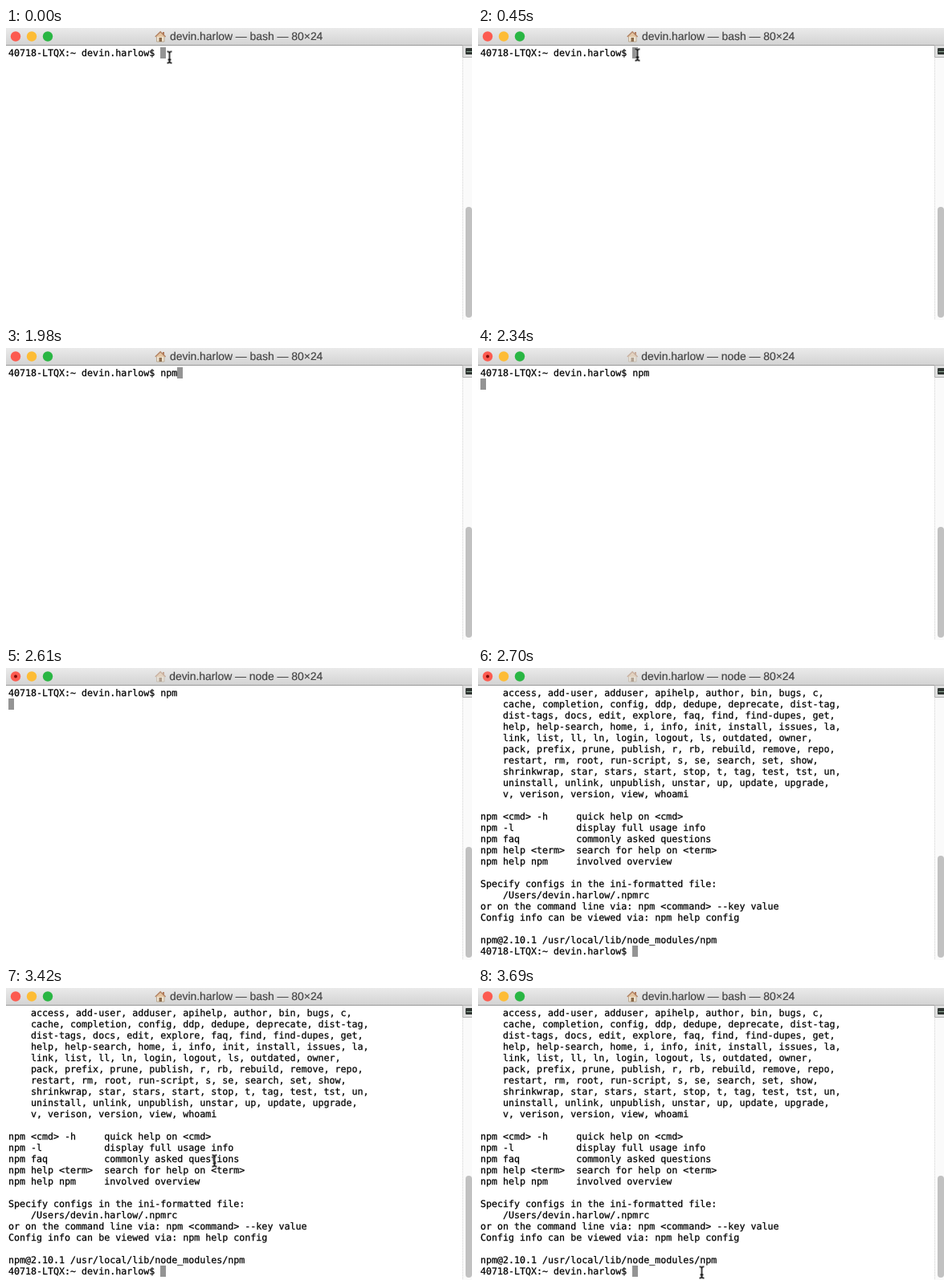
Write an HTML page that moves like this. It is 580 px wide and 364 px high and loops after 3780 ms.

```html
<!DOCTYPE html>
<html lang="en">
<head>
<meta charset="utf-8">
<title>Terminal</title>
<style>
  html, body { margin: 0; width: 100%; height: 100%; overflow: hidden; background: #fff; }
  #stage { position: relative; width: 580px; height: 364px; overflow: hidden; background: #fff; }
  svg, pre, #cursor { position: absolute; left: 0; top: 0; margin: 0; }
  pre {
    left: 3px; top: 24px; color: #000;
    font: 11.65px/14px "DejaVu Sans Mono", monospace;
    text-rendering: geometricPrecision;
    -webkit-text-stroke: .25px #000;
  }
  #cursor { width: 7px; height: 14px; background: #949494; }
  .title {
    font: 13.9px "Liberation Sans", Arial, sans-serif; fill: #404040;
    stroke: #404040; stroke-width: .15px; text-rendering: geometricPrecision;
  }

  /* One loop is 42 ticks of 90 ms; every change is a hard step. */
  .anim { animation: 3780ms step-end infinite; }
  #cursor { animation-name: caret; }
  #pointer { animation-name: pointer; }
  #thumb { animation-name: thumb; }
  .idle { animation-name: idle; }
  .busy { animation-name: busy; }
  .house { animation-name: fade; }
  .before { animation-name: before; }
  .after { animation-name: after; }
  .key1 { animation-name: key1; }
  .key2 { animation-name: key2; }

  @keyframes caret {
    0% { transform: translate(192px, 24px); }
    42.856% { transform: translate(199px, 24px); }
    52.38% { transform: translate(213px, 24px); }
    59.523% { transform: translate(3px, 38px); }
    71.428%, 100% { transform: translate(192px, 346px); }
  }
  @keyframes pointer {
    0% { transform: translate(203.5px, 36.5px); opacity: 1; }
    2.38% { transform: translate(202.5px, 36px); opacity: 1; }
    4.761% { transform: translate(201.5px, 35px); opacity: 1; }
    7.142% { transform: translate(200.5px, 34.5px); opacity: 1; }
    9.523% { transform: translate(199.5px, 34px); opacity: 1; }
    11.904% { transform: translate(198.5px, 33.5px); opacity: 1; }
    42.856% { transform: translate(198.5px, 33.5px); opacity: 0; }
    85.714% { transform: translate(215.5px, 58.5px); opacity: 1; }
    88.095% { transform: translate(240.5px, 130.5px); opacity: 1; }
    90.476% { transform: translate(259.5px, 215.5px); opacity: 1; }
    92.857% { transform: translate(269.5px, 280.5px); opacity: 1; }
    95.238% { transform: translate(274.5px, 319.5px); opacity: 1; }
    97.619%, 100% { transform: translate(278.5px, 354.5px); opacity: 1; }
  }
  @keyframes thumb {
    0% { y: 223px; height: 138px; }
    71.428%, 100% { y: 234px; height: 127px; }
  }
  @keyframes idle {
    0% { visibility: visible; }
    61.904% { visibility: hidden; }
    83.333%, 100% { visibility: visible; }
  }
  @keyframes busy {
    0% { visibility: hidden; }
    61.904% { visibility: visible; }
    83.333%, 100% { visibility: hidden; }
  }
  @keyframes fade {
    0% { opacity: 1; }
    61.904% { opacity: .5; }
    83.333%, 100% { opacity: 1; }
  }
  @keyframes before {
    0% { visibility: visible; }
    71.428%, 100% { visibility: hidden; }
  }
  @keyframes after {
    0% { visibility: hidden; }
    71.428%, 100% { visibility: visible; }
  }
  @keyframes key1 {
    0% { opacity: 0; }
    42.856%, 100% { opacity: 1; }
  }
  @keyframes key2 {
    0% { opacity: 0; }
    52.38%, 100% { opacity: 1; }
  }
</style>
</head>
<body>
<div id="stage">
  <div id="cursor" class="anim"></div>

  <pre class="anim before">40718-LTQX:~ devin.harlow$ <span class="anim key1">n</span><span class="anim key2">pm</span></pre>

  <pre class="anim after">    access, add-user, adduser, apihelp, author, bin, bugs, c,
    cache, completion, config, ddp, dedupe, deprecate, dist-tag,
    dist-tags, docs, edit, explore, faq, find, find-dupes, get,
    help, help-search, home, i, info, init, install, issues, la,
    link, list, ll, ln, login, logout, ls, outdated, owner,
    pack, prefix, prune, publish, r, rb, rebuild, remove, repo,
    restart, rm, root, run-script, s, se, search, set, show,
    shrinkwrap, star, stars, start, stop, t, tag, test, tst, un,
    uninstall, unlink, unpublish, unstar, up, update, upgrade,
    v, verison, version, view, whoami

npm &lt;cmd&gt; -h     quick help on &lt;cmd&gt;
npm -l           display full usage info
npm faq          commonly asked questions
npm help &lt;term&gt;  search for help on &lt;term&gt;
npm help npm     involved overview

Specify configs in the ini-formatted file:
    /Users/devin.harlow/.npmrc
or on the command line via: npm &lt;command&gt; --key value
Config info can be viewed via: npm help config

npm@2.10.1 /usr/local/lib/node_modules/npm
40718-LTQX:~ devin.harlow$ </pre>

  <svg width="580" height="364" viewBox="0 0 580 364">
    <defs>
      <linearGradient id="bar" x2="0" y2="1">
        <stop stop-color="#eaeaea"/>
        <stop offset="1" stop-color="#d2d2d2"/>
      </linearGradient>
      <path id="beam" d="M-3 -7.200Q-.500 -7.200 0 -5.500Q.500 -7.200 3 -7.200M0 -5.500V5.500M-3 7.200Q-.500 7.200 0 5.500Q.500 7.200 3 7.200M-2 3H2"/>
    </defs>

    <!-- title bar -->
    <rect width="580" height="22" fill="url(#bar)"/>
    <rect y="21" width="580" height="1" fill="#999"/>
    <circle cx="12" cy="10.5" r="6.200" fill="#fc5b50"/>
    <circle cx="32" cy="10.5" r="6.200" fill="#fdbc36"/>
    <circle cx="52" cy="10.5" r="6.200" fill="#29b643"/>
    <circle class="anim busy" cx="12" cy="10.5" r="2" fill="#7e0c08"/>

    <g class="anim house">
      <path d="M187.500 10h9.500v7h-9.500z" fill="#f0e4d0" stroke="#b09c84" stroke-width=".8"/>
      <path d="M190.500 12h3.500v5h-3.500z" fill="#8b6a4b"/>
      <path d="M195 5h2v4h-2z" fill="#b0785a"/>
      <path d="M185.800 11L192.200 4.800l6.400 6.200" fill="#e4c4a0" stroke="#b08061" stroke-width="1.400"/>
    </g>
    <text class="title anim idle" x="204" y="15">devin.harlow — bash — 80×24</text>
    <text class="title anim busy" x="203.200" y="15">devin.harlow — node — 80×24</text>

    <!-- scroll bar -->
    <rect x="569" y="22" width="11" height="342" fill="#fafafa"/>
    <path d="M568.500 22V364" stroke="#cfcfcf" stroke-dasharray="1 1"/>
    <rect x="568.500" y="21.500" width="13" height="15" fill="#dedede" stroke="#b4b4b4"/>
    <rect x="572" y="25" width="9" height="8" rx="1" fill="#2f3532"/>
    <path d="M573 29.500h8" stroke="#8fa896"/>
    <rect id="thumb" class="anim" x="572" y="223" width="8" height="138" rx="4" fill="#c1c1c1"/>

    <!-- text pointer -->
    <g id="pointer" class="anim" fill="none">
      <use href="#beam" stroke="#fff" stroke-opacity=".7" stroke-width="2.800"/>
      <use href="#beam" stroke="#000" stroke-width="1.500"/>
    </g>
  </svg>
</div>
</body>
</html>
```
